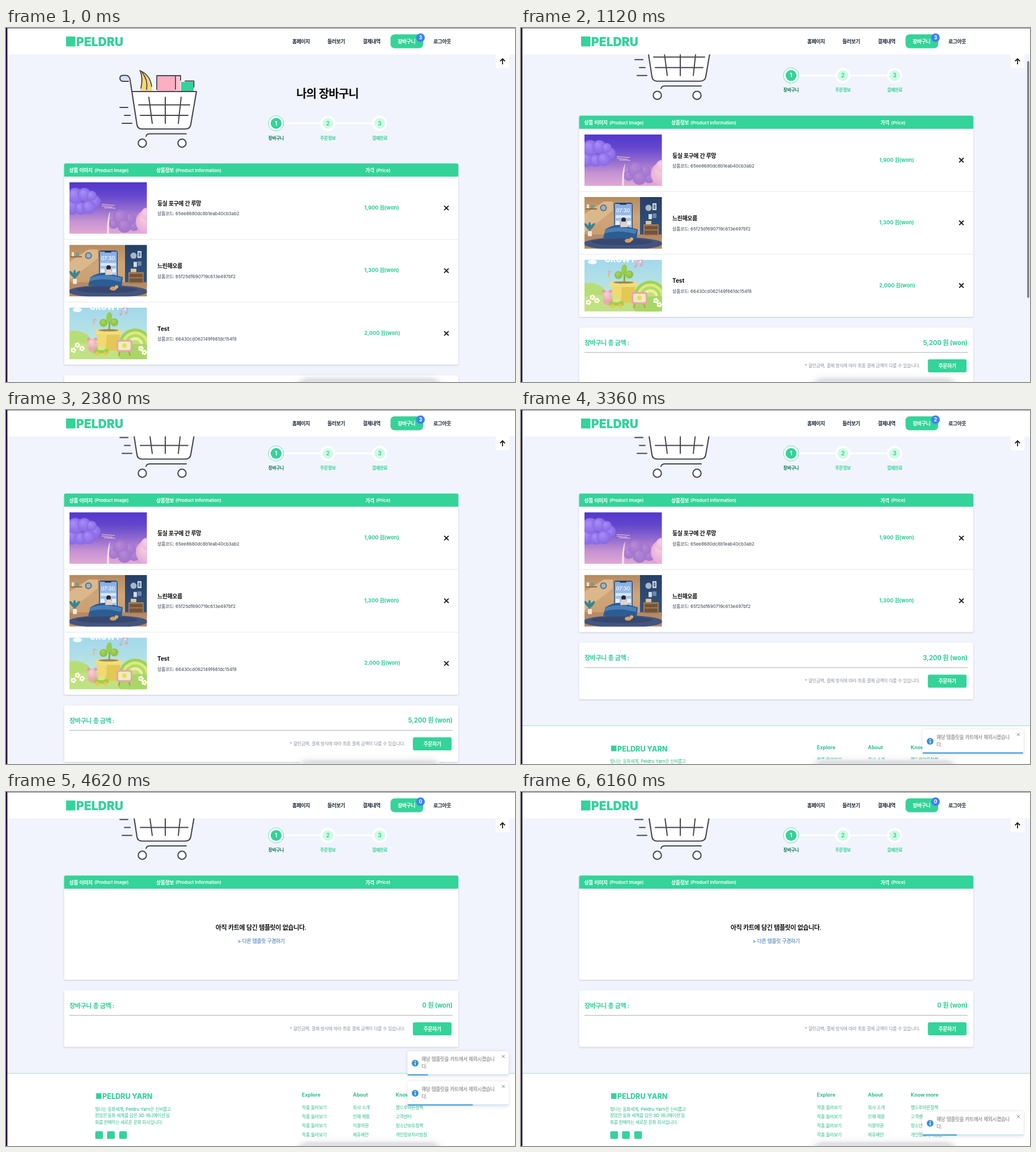
An HTML page with a canvas for the animation above (6.23 s loop, 898 px wide and 624 px high).

```html
<!DOCTYPE html>
<html lang="ko">
<head>
<meta charset="utf-8">
<title>장바구니</title>
<style>
html, body { margin: 0; width: 100%; height: 100%; overflow: hidden; background: #f1f4fc; }
canvas { display: block; width: 898px; height: 624px; }
</style>
</head>
<body>
<canvas id="stage"></canvas>
<script>
const W = 898, H = 624, LOOP = 6230, TICK = 70;
const GREEN = '#34d399', PRICE = '#2bcd92', LEAF = '#2ebd89', INK = '#45464f', BG = '#f1f4fc';
const FONT = 'Inter, "Noto Sans CJK KR", sans-serif';
const ROW = 110.5, BOUNCE = 500, CLOSE = 1590;

const products = [
  { name: '둥실 포구에 간 루망', code: '65ee8680dc8b1eab40cb3ab2', price: 1900, art: skyArt },
  { name: '느린해오름', code: '65f25df690719c613e497bf2', price: 1300, art: roomArt },
  { name: 'Test', code: '66430cd062149f661dc154f8', price: 2000, art: gardenArt }
];
const removals = [2870, 3570, 4620];
const toasts = [
  { enter: 2870, run: 3351 },
  { enter: 3533, run: 4058 },
  { enter: 4610, run: 5110 }
];

const canvas = document.getElementById('stage');
const ctx = canvas.getContext('2d');
const dpr = window.devicePixelRatio || 1;
canvas.width = W * dpr;
canvas.height = H * dpr;

// ---- drawing helpers ----
function rect(x, y, w, h, fill, r = 0) {
  ctx.fillStyle = fill;
  ctx.beginPath();
  ctx.roundRect(x, y, w, h, r);
  ctx.fill();
}

function oval(x, y, rx, ry, fill, turn = 0) {
  ctx.fillStyle = fill;
  ctx.beginPath();
  ctx.ellipse(x, y, rx, ry, turn, 0, 7);
  ctx.fill();
}

function disc(x, y, r, fill) {
  oval(x, y, r, r, fill);
}

function ring(x, y, r, color, width) {
  ctx.strokeStyle = color;
  ctx.lineWidth = width;
  ctx.beginPath();
  ctx.arc(x, y, r, 0, 7);
  ctx.stroke();
}

function line(d, color, width) {
  ctx.strokeStyle = color;
  ctx.lineWidth = width;
  ctx.stroke(new Path2D(d));
}

function area(d, fill) {
  ctx.fillStyle = fill;
  ctx.fill(new Path2D(d));
}

function shade(x, y, w, h, stops) {
  const g = ctx.createLinearGradient(0, y, 0, y + h);
  stops.forEach((c, i) => g.addColorStop(i / (stops.length - 1), c));
  rect(x, y, w, h, g);
}

// soft ball lit from the upper left
function puff(x, y, r, light, dark) {
  const g = ctx.createRadialGradient(x - r * 0.3, y - r * 0.4, r * 0.1, x, y, r);
  g.addColorStop(0, light);
  g.addColorStop(1, dark);
  disc(x, y, r, g);
}

function shadowed(blur, dy, alpha, draw) {
  ctx.save();
  ctx.shadowColor = `rgba(0,0,0,${alpha})`;
  ctx.shadowBlur = blur * dpr;
  ctx.shadowOffsetY = dy * dpr;
  draw();
  ctx.restore();
}

// y is the middle of the line; Hangul is set slightly tighter than Latin
function text(s, x, y, size, weight, color, align = 0) {
  ctx.font = `${weight} ${size}px ${FONT}`;
  ctx.fillStyle = color;
  const hangul = /[가-힣]/;
  const runs = s.match(/[가-힣]+|[^가-힣]+/g).map(str => {
    const spacing = hangul.test(str) ? `${-0.045 * size}px` : '0px';
    ctx.letterSpacing = spacing;
    return { str, spacing, width: ctx.measureText(str).width };
  });
  const base = y + size * (hangul.test(s) ? 0.39 : 0.365);
  x -= align * runs.reduce((sum, r) => sum + r.width, 0);
  for (const r of runs) {
    ctx.letterSpacing = r.spacing;
    ctx.fillText(r.str, x, base);
    x += r.width;
  }
}

function cross(x, y, r, color, width) {
  line(`M${x - r} ${y - r}L${x + r} ${y + r}M${x + r} ${y - r}L${x - r} ${y + r}`, color, width);
}

// ---- product pictures, 136.5 x 91 ----
function skyArt() {
  shade(0, 0, 137, 91, ['#5238cc', '#6347cd', '#8f68cf', '#c592d2', '#e0a8d4']);
  for (const [x, y, r] of [[44, 34, 11], [4, 42, 15], [20, 46, 11], [34, 44, 12], [10, 24, 14], [26, 22, 12], [39, 24, 9]])
    puff(x, y, r, '#a58cf6', '#8a68e4');
  for (const [x, y, r] of [[78, 73, 9], [114, 76, 10], [106, 65, 11], [90, 62, 13], [97, 77, 12]])
    puff(x, y, r, '#b588d8', '#a274cc');
  puff(139, 70, 22, '#f6cfde', '#e6aad6');
  puff(137, 56, 11, '#f6d0e0', '#ecb8da');
  area('M66 91Q66 62 72 51Q69 66 70 91Z', '#f6dcea');
  line('M57 39L80 41M61 45L81 46M57 42L76 44', '#cbabd6', 1.5);
}

function roomArt() {
  shade(0, 0, 98, 72, ['#b58a60', '#cfa678', '#c99d70']);
  area('M0 30L34 8L50 8L50 24L0 62Z', '#dbb88c');
  shade(98, 0, 39, 72, ['#263f66', '#34557f']);
  rect(0, 66, 137, 25, '#b58a66');
  oval(68, 82, 70, 11, '#43547f');
  oval(66, 79, 54, 6, '#374870');
  rect(2, 20, 20, 2, '#8d643f');
  rect(4, 13, 4, 7, '#efe0c4');
  rect(11, 14, 6, 6, '#7a9a8d');
  disc(33.5, 19, 6, '#56718f');
  disc(33.5, 19, 4, '#9db3c4');
  rect(52, 10, 33, 54, '#2e466f', 4);
  shade(53.5, 12, 30, 50, ['#86aee2', '#b4d0f0']);
  rect(62, 11, 12, 2.4, '#22324f', 1.2);
  text('07:30', 68, 23.5, 9, 500, '#fff', 0.5);
  rect(55, 32, 27, 5, '#d8e7f8', 1);
  rect(55, 42, 7, 7, '#e9f1fb', 1);
  rect(75, 42, 7, 7, '#e9f1fb', 1);
  disc(113, 19, 5.5, '#a9b6c6');
  rect(120, 11, 7, 12, '#dfe6f2');
  rect(121.5, 13, 4, 8, '#6d7fae');
  rect(113, 30, 6, 9, '#cfdbea');
  rect(120, 29, 7, 8, '#6d86ad');
  rect(104, 48, 27, 20, '#9f7a57', 1);
  rect(106, 51, 23, 6, '#755337');
  rect(106, 59, 23, 7, '#755337');
  rect(108, 42, 10, 6, '#d8c6a8', 1);
  area('M33 72L37 57Q52 47 68 50L94 57L92 74Z', '#2d5c92');
  area('M37 58Q56 49 92 58L90 65Q60 57 36 64Z', '#4a80b8');
  disc(69, 40, 4, '#2e2530');
  area('M63 53Q64 43 69 43Q75 43 76 53Z', '#e6d3c5');
  for (const a of [-0.7, 0, 0.7]) oval(9 + a * 6, 52, 2.5, 8, '#3c8390', a);
  rect(6, 60, 7, 9, '#efe6d8', 1);
  oval(77, 77, 6, 3.5, '#d99f5f');
  disc(83, 74, 3, '#e1ad70');
}

function gardenArt() {
  shade(0, 0, 137, 91, ['#a2d8ec', '#b6e2e4', '#d8eec6']);
  text('GROWTH', 68, -1, 14, 800, '#fff', 0.5);
  oval(14, 4, 8, 4, '#f3fbff');
  ['#9fd255', '#dcea80', '#b0dc64', '#e9f0a2', '#bfe27a'].forEach((c, i) => disc(116, 66, 29 - i * 5, c));
  oval(8, 60, 30, 19, '#b7de76');
  oval(50, 82, 80, 21, '#bfe283');
  oval(125, 82, 40, 18, '#a8d767');
  line('M69 44Q72 32 69 20', '#7fb53a', 3);
  puff(60, 27, 7, '#a9d556', '#86bf3e');
  puff(79, 26, 7, '#a9d556', '#86bf3e');
  oval(70, 17, 5, 9, '#98cd4c', 0.15);
  area('M48 47H90L86 76H52Z', '#e3c856');
  area('M48 47H66L64 76H52Z', '#efd970');
  rect(45, 39, 48, 9, '#f2dd78', 3);
  oval(69, 40, 18, 2, '#a5874c');
  disc(34, 56, 3, '#e79ca9');
  disc(46, 56, 3, '#e79ca9');
  oval(42, 73, 9, 7, '#eaa9b3');
  puff(40, 63, 8, '#f8d0d2', '#eeb0b8');
  rect(43, 73, 26, 8, '#a5cc44', 3);
  rect(50, 68, 12, 7, '#d4e78b', 2);
  disc(49, 81, 3.5, '#e9c651');
  disc(63, 81, 3.5, '#e9c651');
  rect(83, 57, 28, 21, '#eda2af', 4);
  rect(86, 60, 22, 15, '#e7f0bb', 3);
  disc(97, 67, 4, '#f3d660');
  line('M89 78L87 85M105 78L107 85', '#c98a5b', 2);
  for (const [x, y] of [[14, 66], [22, 72], [7, 75], [126, 72], [132, 79]]) {
    for (let i = 0; i < 5; i++) disc(x + 3 * Math.cos(i * 1.257), y + 3 * Math.sin(i * 1.257), 2, '#fff');
    disc(x, y, 1.6, '#f3cf53');
  }
  line('M92 12V2L102 0V10M43 30V20L48 22', '#ee9fb0', 1.6);
  disc(90, 12, 2.2, '#ee9fb0');
  disc(100, 10, 2.2, '#ee9fb0');
  disc(42, 30, 2, '#f0cf55');
}

// ---- page parts ----
function cart() {
  const handle = 'M216 94H206Q201 93 201 88.5Q201 84 206 83.5H212Q218 84 219 92';
  const basket = 'M219 92L231 170Q232 178 240 178H316Q325 178 326 170L336 112H223';
  ctx.save();
  ctx.lineCap = ctx.lineJoin = 'round';
  area('M237 76Q255 84 258 111H237Q241 92 237 76Z', '#fbd672');
  line('M236 75Q254 82 257 103M237 76Q242 90 238 106M240 78Q251 92 248 108', INK, 1.8);
  rect(266, 85, 33, 26, '#fdaec2');
  rect(300, 85, 8, 26, '#fdc3d0');
  line('M266 108V84H308V92M299 84V108', INK, 1.8);
  rect(309, 95, 22, 16, GREEN);
  line('M316 93.5H331.5V104', INK, 1.8);
  area(handle, '#d8dff5');
  line(handle, INK, 2);
  area('M222 112L231 170Q232 178 240 178H316Q325 178 326 170L336 112Z', '#fff');
  line(basket, INK, 2.1);
  line('M234 135.5H324M237 154H321M252 122L258 168M281 122V168M309 122L304 168', INK, 2);
  line('M247 191Q248 186.5 254 186.5H318M201 140H215M209 154H219M205 168H222', INK, 2);
  for (const x of [240.5, 310.5]) {
    disc(x, 203, 7.2, '#fff');
    ring(x, 203, 7.2, INK, 2.1);
  }
  ctx.restore();
}

function steps() {
  rect(490, 166.5, 65, 3, '#fff');
  rect(581, 166.5, 65, 3, '#fff');
  ['장바구니', '주문정보', '결제완료'].forEach((label, i) => {
    const x = 476.5 + i * 91.4, on = i === 0;
    disc(x, 168, 13.3, '#fff');
    if (on) ring(x, 168, 13.5, GREEN, 0.7);
    disc(x, 168, 9.6, on ? GREEN : '#d1fae5');
    text(String(i + 1), x, 168, 10, 700, on ? '#fff' : GREEN, 0.5);
    text(label, x, 193.5, 7.8, 700, on ? '#06795a' : GREEN, 0.5);
  });
}

function productRow(p, y, last) {
  ctx.save();
  ctx.translate(112, y + 9.8);
  ctx.beginPath();
  ctx.rect(0, 0, 136.5, 91);
  ctx.clip();
  p.art();
  ctx.restore();
  text(p.name, 267, y + 47, 10, 700, '#0b0b0f');
  text('상품코드: ' + p.code, 267, y + 65.3, 7.9, 400, '#374151');
  text(p.price.toLocaleString('en-US') + ' 원(won)', 632, y + 54.3, 9.2, 700, PRICE);
  cross(777, y + 55.2, 3.9, '#111', 1.8);
  if (!last) rect(102.5, y + ROW - 0.5, 695.5, 1, '#e6e8ed');
}

function table(list) {
  const body = list.length ? list.length * ROW : 160.5;
  shadowed(3, 1, 0.18, () => rect(102.5, 238.8, 695.5, 23.2 + body, '#fff', 3));
  rect(102.5, 238.8, 695.5, 23.2, GREEN, [3, 3, 0, 0]);
  text('상품 이미지', 111.5, 250.7, 8.9, 700, '#fff');
  text('(Product Image)', 156, 251, 7.8, 600, '#fff');
  text('상품정보', 265, 250.7, 8.9, 700, '#fff');
  text('(Product Information)', 299, 251, 7.8, 600, '#fff');
  text('가격', 634, 250.7, 8.9, 700, '#fff');
  text('(Price)', 653, 251, 7.8, 600, '#fff');
  list.forEach((p, i) => productRow(p, 262 + i * ROW, i === list.length - 1));
  if (!list.length) {
    text('아직 카트에 담긴 템플릿이 없습니다.', 450, 330.3, 11.1, 600, '#111', 0.5);
    text('> 다른 템플릿 구경하기', 450, 354.3, 8.9, 500, '#2b6cb0', 0.5);
  }
  return 262 + body;
}

function summary(y, total) {
  shadowed(3, 1, 0.18, () => rect(102.5, y, 695.5, 100, '#fff', 3));
  text('장바구니 총 금액 :', 112, y + 26.8, 11.1, 700, PRICE);
  text(total.toLocaleString('en-US') + ' 원 (won)', 788, y + 26.6, 11.1, 700, PRICE, 1);
  rect(112, y + 43.5, 676, 1.2, '#b9bdc3');
  text('* 할인금액, 결제 방식에 따라 최종 결제 금액이 다를 수 있습니다.', 704, y + 67.3, 7.9, 400, '#8a92a0', 1);
  rect(717.8, y + 56.4, 68.3, 23, GREEN, 3);
  text('주문하기', 752, y + 68, 8.9, 700, '#fff', 0.5);
}

function footer(y) {
  rect(0, y, W, 200, '#fff');
  rect(0, y, W, 1, '#9fdcc8');
  rect(159, y + 35.5, 9.5, 10, GREEN);
  text('PELDRU YARN', 170, y + 41.3, 12.6, 800, GREEN);
  ['빛나는 동화세계, Peldru Yarn은 신비롭고', '장엄한 동화 세계를 담은 3D 애니메이션 동', '화를 판매하는 새로운 문화 회사입니다.']
    .forEach((s, i) => text(s, 157, y + 63.3 + i * 11.5, 7.8, 500, LEAF));
  for (const x of [157.5, 178.3, 199.8]) rect(x, y + 102.5, 13.5, 13.5, GREEN, 2);
  const columns = [
    [522, 'Explore', '작품 둘러보기', '작품 둘러보기', '작품 둘러보기', '작품 둘러보기'],
    [612, 'About', '회사 소개', '인재 채용', '이용약관', '제휴제안'],
    [687.5, 'Know more', '펠드루야른정책', '고객센터', '청소년보호정책', '개인정보처리방침']
  ];
  for (const [x, title, ...links] of columns) {
    text(title, x, y + 38.5, 8.9, 700, LEAF);
    links.forEach((s, i) => text(s, x, y + 60 + i * 16, 7.9, 500, LEAF));
  }
  rect(157, y + 135.5, 584, 1, '#6fd8b2');
  text('copyright © by Quovensel All Right Reserved', 157, y + 151.3, 7.8, 500, LEAF);
}

function header(count) {
  rect(0, 0, W, 46.5, '#fff');
  rect(106, 15, 16.5, 17.5, GREEN);
  text('PELDRU', 124, 24.7, 21, 900, GREEN);
  [['홈페이지', 505], ['둘러보기', 567], ['결제내역', 629.5], ['로그아웃', 754]]
    .forEach(([s, x]) => text(s, x, 23.3, 8.9, 600, '#1f2937'));
  shadowed(2, 0.6, 0.15, () => rect(678.5, 11.3, 57.5, 24.2, GREEN, 7));
  text('장바구니', 706.5, 23.3, 8.9, 700, '#fff', 0.5);
  disc(731.3, 17, 7.6, '#3b82f6');
  text(String(count), 731.3, 17, 9, 700, '#fff', 0.5);
  rect(864, 46.5, 24, 24.5, '#fff', [0, 0, 3, 3]);
  line('M876 64V54.5M871.7 58.7L876 54.3L880.3 58.7', '#111', 1.7);
}

function dock() {
  shadowed(14, 0, 0.08, () => rect(512, 615.5, 258, 40, '#ecedf0', 20));
  rect(516, 618, 250, 40, '#e0e1e4', 20);
}

// ---- motion ----
function track(keys, u, power) {
  for (let i = 1; i < keys.length; i++) {
    const [a, from] = keys[i - 1], [b, to] = keys[i];
    if (u < b) return from + (to - from) * (1 - Math.pow(1 - (u - a) / (b - a), power));
  }
  return keys[keys.length - 1][1];
}

function slide(t, { enter, run }) {
  const exit = run + CLOSE;
  return t < exit
    ? track([[0, 1671], [0.6, -14], [0.75, 5.6], [0.9, -2.8], [1, 0]], (t - enter) / BOUNCE, 3)
    : track([[0, 0], [0.2, -11], [1, 1114]], (t - exit) / BOUNCE, 2.4);
}

function toast(t, item, y) {
  const dx = slide(t, item);
  if (dx > 200) return;
  const left = Math.min(1, Math.max(0, 1 - (t - item.run) / CLOSE));
  ctx.save();
  ctx.translate(708.3 + dx, y);
  shadowed(6, 0.6, 0.13, () => rect(0, 0, 178.3, 43, '#fff', 2));
  disc(13.5, 21, 6, '#3a93d6');
  rect(12.8, 19.8, 1.5, 4.6, '#fff');
  disc(13.5, 17.8, 0.95, '#fff');
  text('해당 템플릿을 카트에서 제외시켰습니', 24.7, 13.2, 8.7, 400, '#6f6f6f');
  text('다.', 24.7, 27, 8.7, 400, '#6f6f6f');
  cross(169.2, 9, 2.5, '#777', 1);
  ctx.globalAlpha = 0.2;
  rect(0, 40.2, 178.3, 2.8, '#3498db', [0, 0, 2, 2]);
  ctx.globalAlpha = 0.75;
  rect(0, 40.2, 178.3 * left, 2.8, '#3498db', [0, 0, 0, 2]);
  ctx.restore();
}

function scrollAt(t, count) {
  if (t < 980) return 0;
  if (count === 1) return 86.4;
  return [18, 58, 84.3, 90.3][Math.floor((t - 980) / TICK)] ?? 91.5;
}

function draw(t) {
  const count = 3 - removals.filter(r => t >= r).length;
  const list = products.slice(0, count);
  const scroll = scrollAt(t, count);
  ctx.setTransform(dpr, 0, 0, dpr, 0, 0);
  rect(0, 0, W, H, BG);

  ctx.save();
  ctx.translate(0, -scroll);
  cart();
  text('나의 장바구니', 567, 115, 20, 700, '#0b0b0f', 0.5);
  steps();
  const top = table(list) + 18.5;
  summary(top, list.reduce((sum, p) => sum + p.price, 0));
  footer(top + 146);
  ctx.restore();

  header(count);
  dock();

  const shown = toasts.filter(o => t >= o.enter);
  shown.forEach((o, i) => toast(t, o, 563 - 53 * (shown.length - 1 - i)));

  if (t >= 980 && t < 2030) rect(893, 2 + scroll * 0.668, 3.6, 417.5, '#7d7e85', 1.8);
  rect(0, 0, W, 0.8, '#5c5b66');
  rect(0, 0, 2.4, H, '#1f0d3d');
}

const start = performance.now();
let last = -1;
function loop() {
  const t = Math.floor(((performance.now() - start) % LOOP) / TICK) * TICK;
  if (t !== last) draw(last = t);
  requestAnimationFrame(loop);
}
loop();
</script>
</body>
</html>
```
